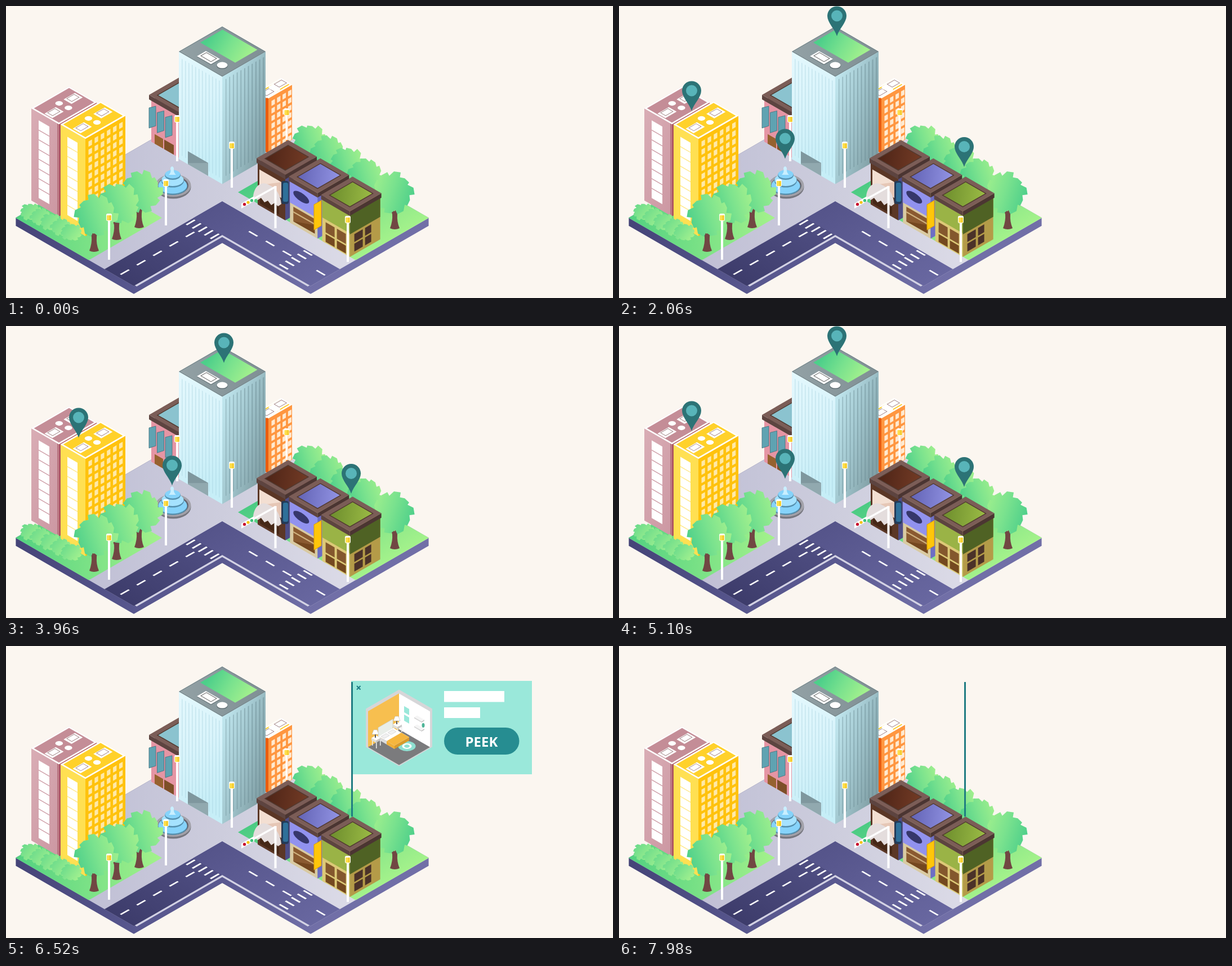
These frames come from a looping animation (1078 by 519 pixels, 8 s). An HTML page:

```html
<!DOCTYPE html>
<html lang="en">
<head>
<meta charset="utf-8">
<title>Isometric town</title>
<style>
html,body{margin:0;width:100%;height:100%;overflow:hidden;background:#fbf6f0}
svg{display:block;width:100%;height:100%}
</style>
</head>
<body>
<svg id="stage" viewBox="0 0 1078 519" xmlns="http://www.w3.org/2000/svg"></svg>
<script>
const K = Math.tan(Math.PI / 6); // slope of the isometric axes
const LOOP = 8000;

const times = (n, f) => Array.from({ length: n }, (_, i) => f(i)).join('');
const rect = (x, y, w, h, fill, more = '') =>
  `<rect x="${x}" y="${y}" width="${w}" height="${h}" fill="${fill}" ${more}/>`;
const oval = (x, y, rx, ry, fill, more = '') =>
  `<ellipse cx="${x}" cy="${y}" rx="${rx}" ry="${ry}" fill="${fill}" ${more}/>`;
const dot = (x, y, r, fill) => oval(x, y, r, r, fill);
const path = (d, fill, more = '') => `<path d="${d}" fill="${fill}" ${more}/>`;
const group = (body, more = '') => `<g ${more}>${body}</g>`;
const outline = (color, w) => `stroke="${color}" stroke-width="${w}"`;
const at = (x, y, body) => group(body, `transform="translate(${x} ${y})"`);
// Upright plane whose horizontals have the given slope
const wall = (x, y, slope, body) => group(body, `transform="matrix(1 ${slope} 0 1 ${x} ${y})"`);
// Level plane: first axis runs down right, second down left
const flat = (x, y, body) => group(body, `transform="matrix(1 ${K} -1 ${K} ${x} ${y})"`);

// Box with its top front corner at x, y; l and r are the widths of both walls
function block(x, y, l, r, h, [left, right, top], onLeft = '', onRight = '', onTop = '') {
  return wall(x - l, y - l * K, K, rect(0, 0, l, h, left) + onLeft) +
    wall(x, y, -K, rect(0, 0, r, h, right) + onRight) +
    flat(x - l + r, y - (l + r) * K, rect(0, 0, l, r, top) + onTop);
}

const gradients = {
  leaf: [0, .6, 1, .3, '#4dcf8a', '#7ae28e', '#a2f08d'],
  bush: [0, .2, 1, .8, '#68da8b', '#a6f28f'],
  lawn: [0, .5, 1, .5, '#4bcb83', '#a4f28b'],
  garden: [0, 1, 1, 0, '#52d181', '#a4f28b'],
  plaza: [0, 1, 1, 0, '#b9b8d1', '#cdcddd', '#e4e3ed'],
  side: [0, 0, 1, 0, '#454478', '#55548b', '#716fa7'],
  roadL: [0, 1, 0, 0, '#3d3c6b', '#55548a'],
  roadR: [0, 0, 1, 0, '#55548a', '#6867a0'],
  glassL: [0, 0, .5, 1, '#e4f8fd', '#d9f4fb', '#c6eef7'],
  glassR: [0, 0, 1, .7, '#c2e8f0', '#a3c8d0', '#83a2a8'],
  slab: [0, 1, 1, 0, '#93a1a5', '#7f8f94'],
  rose: [0, 0, 1, 1, '#d9adb5', '#cc97a2'],
  choc: [0, 1, 1, 0, '#4d2417', '#733b25'],
  violet: [0, 1, 1, 0, '#6263b5', '#9394e4'],
  olive: [0, 1, 1, 0, '#6d8d2d', '#9bbb45']
};
const defs = Object.entries(gradients).map(([id, [x1, y1, x2, y2, ...colors]]) =>
  `<linearGradient id="${id}" x1="${x1}" y1="${y1}" x2="${x2}" y2="${y2}">` +
  colors.map((c, i) => `<stop offset="${i / (colors.length - 1)}" stop-color="${c}"/>`).join('') +
  '</linearGradient>').join('');

const SIZE = 367, INNER = 210, KERB = 158, LAWN = 130; // measures of the plan

function ground() {
  const shape = `M0,0H${SIZE}V${INNER}H${INNER}V${SIZE}H0Z`;
  const base = times(15, i => flat(384, 178.7 - i, path(shape, 'url(#side)')));
  const road = INNER - KERB, lane = KERB + 22.5;
  return base + flat(384, 164.7,
    path(shape, 'url(#plaza)') +
    rect(0, SIZE - LAWN, LAWN, LAWN, 'url(#garden)') +
    rect(KERB, 0, SIZE - KERB, LAWN, 'url(#lawn)') +
    rect(KERB, KERB, road, SIZE - KERB, 'url(#roadL)') +
    rect(KERB, KERB, SIZE - KERB, road, 'url(#roadR)') +
    path(`M${SIZE - 2},${INNER + 1.5}H${INNER + 1.5}V${SIZE - 2}`, 'none', outline('#d3d2e4', 3.2)) +
    times(5, i => rect(lane - 1.3, 230 + 29 * i, 2.6, 15, '#fff') +
      (i === 3 ? '' : rect(228 + 30 * i, lane - 1.3, 15, 2.6, '#fff')) +
      rect(161 + 10.7 * i, 211, 2.8, 15, '#fff') +
      rect(306, 160 + 10.7 * i, 15, 2.8, '#fff')));
}

// Vents and hatches on a flat roof of a by b
function roofKit(a, b) {
  const hatch = (x, y) => rect(x - 7, y - 10, 14, 20, '#fff') +
    rect(x - 5.5, y - 7, 9, 13, '#fff', outline('#98797c', .8));
  return rect(1, 1, a - 2, b - 2, 'none', outline('#fff', 2.6)) +
    hatch(a * .55, b * .8) + hatch(a * .45, b * .22) +
    dot(a * .35, b * .52, 4.8, '#fff') + dot(a * .66, b * .5, 4.8, '#fff');
}

const panes = (cols, rows, dx, dy, w, h, fill) =>
  times(cols, c => times(rows, r => rect(5.5 + c * dx, 8 + r * dy, w, h, fill)));

const strip = (x, y, w, h, n, gap) => rect(x, y, w, h, '#fff') +
  times(n - 1, i => rect(x, y + (i + 1) * h / n - .8, w, 1.6, gap));

// Sunken roof with a raised rim, standing over the walls
function rimRoof(x, y, l, r, floor) {
  return block(x, y, l, r, 8, ['#5d4440', '#4b3532', '#7b5d57'], '', '',
    rect(8, 8, l - 15, r - 15, floor, outline('#50392f', 1.4)));
}

function backBlocks() {
  const shutters = times(3, i => path('M0,2L12,-1V34L0,38Z', '#5fa3b2',
    `transform="translate(${254 + i * 14.5} ${179 + i * 8.4})" ${outline('#3f6f7c', .8)}`));
  return block(320, 204, 62, 76, 73, ['#e595a4', '#c97a8a', '#7a5a55'],
      rect(6, 56, 15, 17, '#96622f') + rect(23, 56, 17, 17, '#7d4f28')) +
    rimRoof(320, 196, 66, 80, '#8bc3cf') + shutters +
    block(466, 164, 20, 42, 98, ['#ea5d10', '#ff9640', '#ffc91b'], '',
      panes(4, 7, 9.8, 13.4, 6, 9, '#ffe9cf'), roofKit(20, 42));
}

function tower() {
  const hatch = rect(24, 53, 25, 16, '#5f6d72') + rect(23, 52, 25, 16, '#fff') +
    rect(26, 54, 18, 10, '#fff', outline('#5a5a5a', .9));
  return block(384, 125.5, 77, 77, 191, ['url(#glassL)', 'url(#glassR)', 'url(#slab)'],
    times(12, i => rect(5 + i * 6, 10, 1.6, 172, '#a3cddb', 'opacity=".4"')) +
      rect(16, 168, 36, 23, '#91a9af') + path('M16,168H52L16,189Z', '#7f979e'),
    times(11, i => rect(6 + i * 6.6, 8, 1.3 + i * .1, 172, '#6c8b94', 'opacity=".5"')),
    rect(.5, .5, 76, 76, 'none', outline('#74858a', 1)) + rect(5, 4.5, 62, 39.5, 'url(#leaf)') +
      hatch + dot(60.5, 60.5, 6.9, '#5f6d72') + dot(59.3, 59.3, 6.7, '#fff'));
}

function leftBlocks() {
  return block(94, 210, 49, 67, 164, ['url(#rose)', '#ad5560', '#c48d97'],
      strip(13, 14, 19, 138, 8, '#cb98a2') + rect(46, 0, 2.5, 162, '#b7737f'), '', roofKit(49, 67)) +
    block(141, 236, 44, 71, 173, ['#ffe052', '#ffc20d', '#ffd12a'],
      strip(12, 15, 18, 139, 8, '#ffe88a'), panes(6, 11, 10.9, 14.5, 6.2, 9.5, '#ffe9a8'), roofKit(44, 71));
}

// Saw-edged leaf mass, its teeth varied by the seed
function crown(x, y, r, seed, flip = 1, fill = 'url(#leaf)', squash = 1) {
  const teeth = 10, step = 2 * Math.PI / teeth;
  const point = (a, k) => `${(r * k * Math.cos(a)).toFixed(1)},${(r * k * squash * Math.sin(a)).toFixed(1)}`;
  const edge = times(teeth, i => {
    const a = i * step + seed, jut = 1 + .07 * Math.sin(seed * 7 + i * 2.4);
    return `${i ? 'L' : 'M'}${point(a, .84)}L${point(a + .1 * step, jut + .03)}L${point(a + .6 * step, jut)}`;
  });
  return group(path(edge + 'Z', fill), `transform="translate(${x} ${y}) scale(${flip} 1)"`);
}

function tree(x, y, seed, flip = 1) {
  const stem = path('M-8,63Q-3,50 -4,38L-8,27L0,33L7,24L5,38Q4,52 9,63Q0,67 -8,63Z', '#714743');
  return at(x - 4 * flip, y, stem) + crown(x, y, 36.5, seed, flip);
}

function fountain() {
  const tiers = times(3, i => oval(-1, -10 * i + 1, 26 - 6 * i, 15 - 3.5 * i, '#5590ae') +
    oval(-1, -10 * i - 1, 25.5 - 6 * i, 14.5 - 3.5 * i, i % 2 ? '#a5e2ff' : '#86d3fa'));
  return at(297, 320, oval(0, 2, 31.5, 20.5, '#77777f') + oval(0, -1, 31.5, 20, '#a2a1a9') +
    oval(0, -1, 27, 16.5, '#63636d') + tiers + path('M-8,-20Q-3,-24 -5,-32Q-2,-38 1,-32Q0,-24 5,-20Z', '#c9efff'));
}

function lamp(x, y, h = 82) {
  return at(x, y, rect(-2, 10, 4, h - 10, '#fff') + rect(-5, 0, 10, 13, '#fff', 'rx="2.5"') +
    rect(-4, 3, 8, 9, '#ffe04d', 'rx="1"') + rect(0, 3, 4, 9, '#f6cf35', 'rx="1"'));
}

function shops() {
  const cafe = rect(3, 10, 39, 28, '#f3dfd2') + path('M3,38L42,10V38Z', '#e6c7b6') + rect(4, 52, 34, 18, '#462817');
  const pool = rect(0, 0, 49, 38, '#9192ee') + oval(20, 17, 14, 8, '#36376b') +
    rect(6, 42, 38, 26, '#8a5a30') + rect(6, 50, 38, 2.5, '#d0b27f') + path('M6,68L44,53V68Z', '#74471f');
  const store = rect(0, 0, 49, 32, '#9ab346') +
    times(2, i => rect(6 + 20 * i, 37, 16, 18, '#84582d') + rect(6 + 20 * i, 58, 16, 14, '#74491f'));
  const storeSide = rect(0, 0, 54, 34, '#4f6224') +
    times(4, i => rect(8 + 19 * (i % 2), 38 + 17 * (i >> 1), 15 - 4 * (i % 2), 14, '#4b3229'));
  const kinds = [
    ['#5b3726', '#4e4d86', 'url(#choc)', cafe, ''],
    ['#d9caa2', '#6d6dc4', 'url(#violet)', pool, ''],
    ['#dcc977', '#b49b48', 'url(#olive)', store, storeSide]
  ];
  const awning = path('M0,20C3,-4 20,-6 28,0Q47,8 50,34L44,38L38,32L32,36L26,28L20,31L14,23L8,27Z', '#e4dddd');
  const signs = [
    at(439, 318, awning) + rect(489, 311, 13, 41, '#243b59', 'rx="4"') + rect(492, 314, 9, 34, '#2f7099', 'rx="3"'),
    wall(547, 353, -K, rect(0, 0, 13, 45, '#ffc60a', outline('#d99d00', 1))),
    ''
  ];
  return kinds.map(([left, right, floor, front, side], i) => {
    const x = 496 + 57.3 * i, y = 300 + 32.5 * i;
    return block(x, y + 7, 49, 54, 74, [left, right, left], front, side) + rimRoof(x, y, 51, 56, floor) + signs[i];
  }).join('');
}

function trafficLight() {
  return rect(476.5, 320, 4, 75, '#fff') + path('M479,321L438,344', 'none', outline('#fff', 3.5)) +
    wall(418, 351, -K, rect(0, 0, 23, 9, '#fff')) +
    ['#c8102e', '#f3c317', '#3fc37d'].map((c, i) => dot(423.5 + 6.5 * i, 352.5 - 3.4 * i, 2.7, c)).join('');
}

function town() {
  return ground() + backBlocks() + tower() + lamp(498.5, 182, 56) + leftBlocks() + lamp(304, 194) + fountain() +
    times(4, i => crown(539 + 33 * i, 241 + 20 * i, 30, i + 2)) + tree(686, 332, 3, -1) +
    lamp(401, 241) + shops() + trafficLight() +
    times(5, i => crown(44 + 18 * i, 366 + 9 * i, 19, i, 1, 'url(#bush)', .8)) +
    times(3, i => tree(240 - 40 * i, 330 + 21 * i, i + 1)) +
    lamp(284, 308) + lamp(183, 369) + lamp(607, 373);
}

function bedroom() {
  const hexagon = times(6, i => {
    const a = (i + .5) * Math.PI / 3;
    return `${i ? 'L' : 'M'}${698 + 68 * Math.cos(a)},${145.5 + 68 * Math.sin(a)}`;
  }) + 'Z';
  const legs = times(3, i => rect(7 * i - 7, 3 + 5 * (i % 2), 1.5, 11, '#eee'));
  const stand = (x, y) => at(x, y, legs + block(0, 5, 8, 8, 4, ['#dedede', '#c9c9c9', '#fff']) +
    rect(-2, -7, 2, 7, '#555') + path('M-4,-14h6l3,8h-12z', '#fff', outline('#bbb', .6)));
  const shelf = y => block(738, y, 13, 5, 2, ['#d4d4d4', '#c4c4c4', '#f5f5f5']);
  const rug = [11, 6, 3.5].map((r, i) => dot(33, 19, r, i % 2 ? '#fff' : '#8fe0d1')).join('');
  const linen = rect(14, 0, 14, 26, '#f5b63e') +
    times(2, i => rect(2, 3 + 12 * i, 6, 9, '#f1f1f1', outline('#d5d5d5', .6)));
  const blanket = rect(14, 0, 14, 6, '#f0ae35');
  return path(hexagon, '#d6d6d8') +
    wall(643, 116, -K, rect(0, 0, 55, 64, '#f7bf4f')) +
    wall(698, 84.5, K, rect(0, 0, 55, 64, '#fff') + times(2, i => rect(9, 17 + 15 * i, 9, 11, '#9ae8da'))) +
    flat(698, 148, rect(0, 0, 55, 55, '#7b7b7d') + rug) +
    shelf(134) + shelf(150) + oval(741, 141, 2.5, 4, '#4fb598') + stand(695, 139) +
    wall(661, 145, -K, rect(0, 0, 26, 20, '#e9eee9', outline('#ccd2cc', .7))) +
    block(690, 177, 28, 26, 6, ['#dcdcdc', '#d99a2b', '#fff'], blanket, '', linen) +
    stand(657, 163);
}

function cardBody() {
  return path('M623,71l6.5,6.5m0,-6.5l-6.5,6.5', 'none', outline('#1d7d85', 2)) + bedroom() +
    rect(778, 80, 107, 19.5, '#fff') + rect(778, 109, 64, 19, '#fff') +
    rect(778, 145, 133.5, 48, '#268d91', 'rx="24"') +
    '<text x="844.5" y="178.5" text-anchor="middle" font-family="\'Open Sans\',\'Noto Sans\',sans-serif" ' +
    'font-weight="700" font-size="24" fill="#fff">PEEK</text>';
}

const pin = (x, y) => at(x, y,
  path('M0,0C-4,-13 -17,-24 -17,-36A17,17 0 0 1 17,-36C17,-24 4,-13 0,0Z', '#2c7376') + dot(0, -36, 10, '#58b4b9'));

const $ = id => document.getElementById(id);
$('stage').innerHTML = `<defs>${defs}<clipPath id="wipe"><rect id="wipeBox" x="613" y="62" height="166"/></clipPath></defs>` +
  town() +
  group(pin(387, 53.5) + pin(129, 186.5) + pin(295, 271.5) + pin(613, 286), 'id="pins"') +
  group(rect(613, 62, 321, 166, '#9ae8da') + group(cardBody(), 'id="body"'), 'clip-path="url(#wipe)"') +
  rect(613, 64, 3, 239, '#1f7c82', 'id="pole"');

const span = (t, a, b) => Math.min(1, Math.max(0, (t - a) / (b - a)));
const easeOut = p => 1 - (1 - p) * (1 - p);

function draw(t) {
  const bob = 6 - 6 * Math.cos((t - 2060) / 760 * 2 * Math.PI);
  $('pins').setAttribute('transform', `translate(0 ${bob.toFixed(2)})`);
  $('pins').setAttribute('visibility', t >= 940 && t < 5490 ? 'visible' : 'hidden');

  const pole = 239 * easeOut(span(t, 5480, 5820));
  $('pole').setAttribute('y', 303 - pole);
  $('pole').setAttribute('height', pole);

  const close = easeOut(span(t, 7620, 7980));
  $('wipeBox').setAttribute('width', 321 * easeOut(span(t, 5820, 6180)) * (1 - close));
  $('body').setAttribute('opacity', easeOut(span(t, 6170, 6520)) * (1 - close));
}

const start = performance.now();
function tick() {
  draw((performance.now() - start) % LOOP);
  requestAnimationFrame(tick);
}
tick();
</script>
</body>
</html>
```
